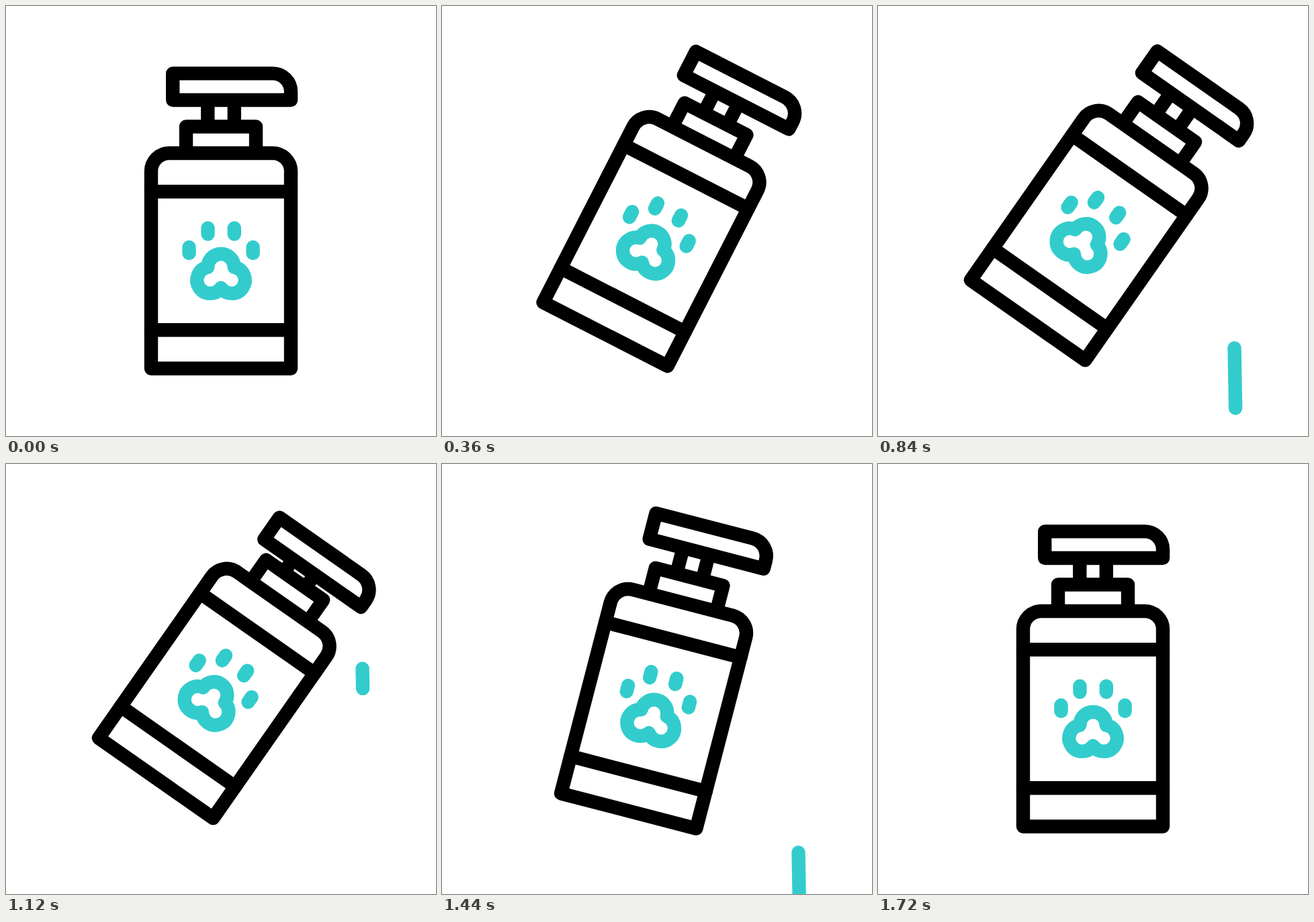
Recreate the animation shown at these times as an HTML page. Size 640 px wide and 640 px high, loop 2000 ms.

```html
<!DOCTYPE html>
<html lang="en">
<head>
<meta charset="utf-8">
<title>Pump bottle</title>
<style>
  html, body { margin: 0; width: 100%; height: 100%; overflow: hidden; background: #fff; }
  svg { display: block; width: 100vw; height: 100vh; }
  path { fill: none; stroke: #000; stroke-width: 20.4; stroke-linecap: round; stroke-linejoin: round; }
  .solid { fill: #fff; }
  .flat { stroke-linecap: butt; }
  .teal { stroke: #33cccc; }
</style>
</head>
<body>
<svg viewBox="0 0 640 640">
  <path id="drop" class="teal"/>
  <g id="bottle">
    <g id="pump">
      <path class="flat" d="M300.3 140V179.5M339.8 140V179.5"/>
      <path class="solid" d="M248.2 100.4H397A27 27 0 0 1 424 127.4V140H248.2Z"/>
    </g>
    <path class="solid flat" d="M268 219V179.5H372V219"/>
    <path class="solid" d="M216 539.5V246A27 27 0 0 1 243 219H397A27 27 0 0 1 424 246V539.5Z"/>
    <path d="M216 276.3H424M216 482.3H424"/>
    <g id="paw">
      <path class="teal" d="M300.5 330.5V339.5M339.8 330.5V339.5M272.5 359V368M367.6 359V368"/>
      <path class="teal" d="M300.3 388.7A19.7 19.7 0 0 1 339.7 388.7A19.7 19.7 0 1 1 320 419.5A19.7 19.7 0 1 1 300.3 388.7Z"/>
    </g>
  </g>
</svg>
<script>
  const LOOP = 2000, STEP = 40;
  const $ = id => document.getElementById(id);
  const bottle = $('bottle'), pump = $('pump'), drop = $('drop');

  // Smooth 0..1 ramp between two times
  const ramp = (t, from, to) => {
    const x = Math.min(1, Math.max(0, (t - from) / (to - from)));
    return x * x * (3 - 2 * x);
  };

  const tilt = t => ramp(t, 40, 502) - ramp(t, 1120, 1695);

  const press = t => 16.4 * (ramp(t, 280, 560) - ramp(t, 560, 800)
    + ramp(t, 800, 1095) - ramp(t, 1095, 1360));

  // One falling streak: constant speed, growing length
  function streak(u) {
    if (u < 0 || u > 519) return '';
    const top = 224.4 + 0.855 * u;
    const len = 0.335 * u - 0.0002 * u * u;
    return `M530.5 ${top}l${len * 0.018} ${len + 0.01}`;
  }

  function draw(t) {
    const k = tilt(t);
    bottle.setAttribute('transform',
      `translate(${320 - 5.4 * k} ${380 - 43.2 * k}) rotate(${35 * k}) translate(-320 -380)`);
    pump.setAttribute('transform', `translate(0 ${press(t)})`);
    drop.setAttribute('d', streak(t - 507) + streak(t - 1026.3));
  }

  const start = performance.now();
  function tick() {
    const t = (performance.now() - start) % LOOP;
    draw(Math.floor(t / STEP) * STEP);
    requestAnimationFrame(tick);
  }
  tick();
</script>
</body>
</html>
```
